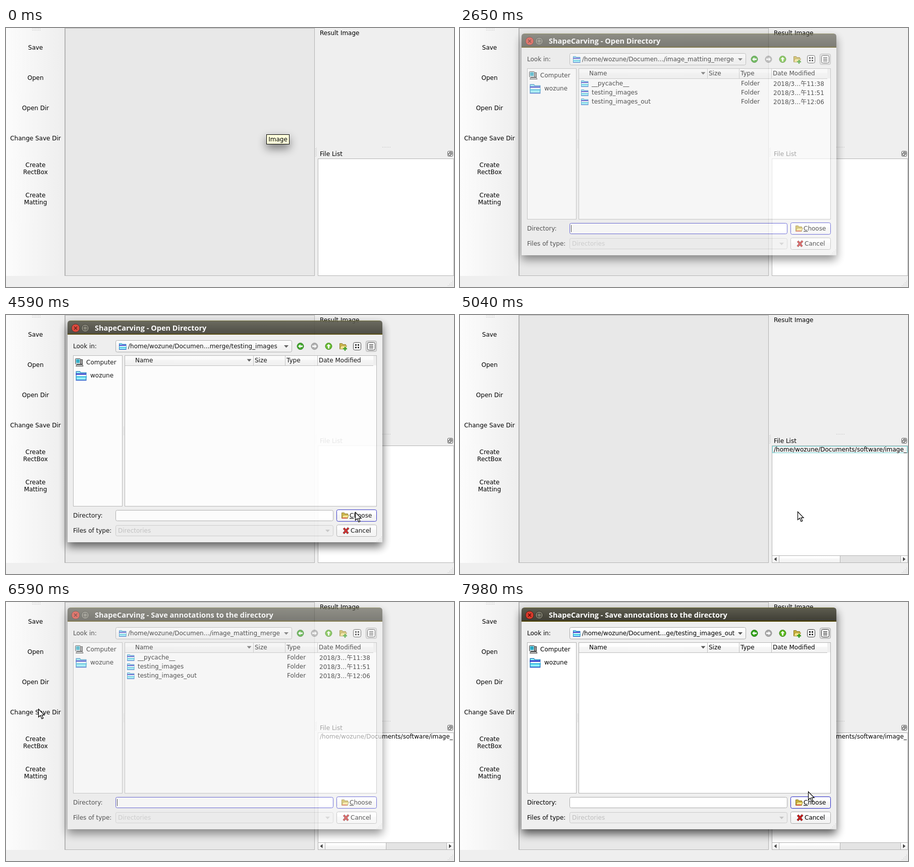
These frames come from a looping animation (888x514 px, 8000 ms). An HTML page:

```html
<!DOCTYPE html>
<html lang="en">
<head>
<meta charset="utf-8">
<title>Matting tool</title>
<style>
html, body { margin: 0; width: 100%; height: 100%; overflow: hidden; background: #efefef; }
svg { display: block; font: 12px "DejaVu Sans", "Noto Sans CJK SC", "Noto Sans CJK", sans-serif; }
.shadow { filter: blur(9px); }
.title { font: bold 14.5px "Open Sans", sans-serif; fill: #fff; }
.mid { text-anchor: middle; }
.dots { stroke: #b4b4b4; stroke-dasharray: 1 2; }
</style>
</head>
<body>
<svg id="stage" width="888" height="514" viewBox="0 0 888 514"></svg>
<script>
const USER = 'wozune', APP = 'ShapeCarving', HOME = `/home/${USER}/`;

// Markup helpers
const box = (x, y, w, h, fill, stroke = 'none', r = 0, extra = '') =>
  `<rect x="${x + .5}" y="${y + .5}" width="${w - 1}" height="${h - 1}" rx="${r}" fill="${fill}" stroke="${stroke}" ${extra}/>`;
const fillBox = (x, y, w, h, fill, extra = '') =>
  `<rect x="${x}" y="${y}" width="${w}" height="${h}" fill="${fill}" ${extra}/>`;
const text = (x, y, s, extra = '') => `<text x="${x}" y="${y}" ${extra}>${s}</text>`;
const path = (d, fill, stroke = 'none', extra = '') => `<path d="${d}" fill="${fill}" stroke="${stroke}" ${extra}/>`;
const group = (x, y, body, scale = 1) => `<g transform="translate(${x} ${y}) scale(${scale})">${body}</g>`;
const dots = (x, y, w, h = 0) => path(`M${x} ${y}l${w} ${h}`, 'none', '', 'class="dots"').replace('stroke="" ', '');
const gradient = (id, stops, across) =>
  `<linearGradient id="${id}" x2="${across ? 1 : 0}" y2="${across ? 0 : 1}">` +
  stops.map(([at, color]) => `<stop offset="${at}" stop-color="${color}"/>`).join('') + '</linearGradient>';
const grip = (x, y) => [0, 1, 2, 3].map(i => dots(x + 9 - 3 * i, y + 3 * i + .5, 3 * i + 1)).join('');
const downArrow = (x, y, fill) => path(`M${x} ${y}h9l-4.5 5z`, fill);

const folder = (x, y, scale = 1) => group(x, y,
  path('M1.5 13V1.5h5l1 1.5h7.5v10z', '#8ff4fb', '#1d7fc0') +
  fillBox(1, 4, 14, 2, '#2929c4') + fillBox(2, 6, 13, 2, '#fff') + fillBox(1, 8, 15, 1.5, '#28b4dc') +
  path('M1 13.5h14.5', 'none', '#2a5ad0'), scale);
const goldFolder = (x, y) => group(x, y,
  path('M1.5 13.5V2.5h5l1 2h6v9z', '#c9b23c', '#8b7420') +
  path('M1.5 13.5l3-6.5h11l-3 6.5z', '#f3e383', '#a28a2c'));
const navButton = (x, color, edge, angle) =>
  `<g transform="translate(${x} 62) rotate(${angle})"><circle r="6.5" fill="${color}" stroke="${edge}"/>` +
  path('M-4.5 0L0 -4V-1.5H4.5V1.5H0V4z', '#fff') + '</g>';

const mainWindow = () => {
  const labels = [['Save', 43], ['Open', 103], ['Open Dir', 163], ['Change Save Dir', 223],
    ['Create', 276], ['RectBox', 290], ['Create', 336], ['Matting', 350]];
  return fillBox(0, 0, 888, 514, '#efefef') +
    fillBox(0, 0, 116, 492, 'url(#toolbar)') + dots(52, 1.5, 17) + dots(52, 4.5, 17) +
    box(116, 0, 496, 492, '#e8e8e8', '#b4b4b4') + fillBox(117, 0, 1, 492, '#b4b4b4') +
    `<g id="hover">${box(0, 0, 117, 60, 'url(#button)', '#a8a8a8', 2)}</g>` +
    labels.map(([s, y]) => text(58.5, y, s, 'class="mid"')).join('') +
    text(622, 14, 'Result Image') + text(622, 254, 'File List') +
    dots(746, 236.5, 17) + dots(615.5, 238, 0, 17) + dots(613.5, 239, 0, 17) +
    box(875, 244, 11, 11, '#f4f4f4', '#555', 2) + box(879, 246, 5, 5, 'none', '#444') + box(877, 248, 5, 5, '#f4f4f4', '#444') +
    box(618, 259, 270, 233, '#fff', '#b4b4b4') +
    `<g id="files">` +
      `<g id="rowFocus">${box(619, 260, 268, 14, '#f2f2f2', '#6fd6d6')}</g>` +
      text(622, 271, HOME + 'Documents/software/image_') +
      fillBox(619, 477, 268, 14, '#e4e4e4') + path('M619 477.5h268', 'none', '#b4b4b4') +
      box(618, 477, 15, 15, 'url(#button)', '#b4b4b4') + box(632, 477, 122, 15, 'url(#button)', '#b4b4b4') +
      box(873, 477, 15, 15, 'url(#button)', '#b4b4b4') +
      path('M627.5 480.5v8l-5 -4zM878 480.5v8l5 -4z', '#444') +
    `</g>` +
    text(6, 507, '', 'id="status"') + grip(876, 502) +
    `<g id="tooltip">${fillBox(516, 219, 46, 20, '#000', 'class="shadow" opacity=".5"')}` +
      box(516, 211, 46, 20, '#ffffdc', '#000') + text(539, 225, 'Image', 'class="mid"') + '</g>';
};

const titleBar = () =>
  path('M122 39V17q0-6 6-6H740q6 0 6 6V39z', 'url(#title)') + path('M127 11.5H741', 'none', '#6c6a2c') +
  fillBox(122, 37, 624, 2, '#4c4000') +
  '<circle cx="138" cy="26" r="8" fill="#dc3a2c" stroke="#4a2018"/>' +
  path('M135 23l6 6m0-6l-6 6', 'none', '#501008', 'stroke-width="1.5"') +
  '<circle cx="157" cy="26" r="7.5" fill="#7c7b6c" stroke="#35342c"/>' + box(153, 22, 8, 8, 'none', '#35342c') +
  text(176, 31, '', 'id="title-text" class="title"');

const navigation = () =>
  text(133, 66, 'Look in:') + box(217, 50, 350, 24, 'url(#button)', '#ababab', 3) +
  folder(223, 55) + text(242, 66, '', 'id="location"') + downArrow(551, 60, '#555') +
  navButton(583.5, '#31a318', '#1d7010', 0) + navButton(611.5, '#a8a8a8', '#8e8e8e', 180) +
  navButton(639.5, '#5cb81c', '#2c7a10', 90) +
  goldFolder(660, 54) + path('M672 63v8m-4-4h8', 'none', '#2f9a18', 'stroke-width="2.5"') +
  box(688, 54, 16, 16, '#fff', '#333', 3) +
  [692, 697].map(x => [58, 63].map(y => fillBox(x, y, 3, 3, '#222')).join('')).join('') +
  box(713, 51, 22, 22, '#dedede', '#a4a4a4', 3) + box(716, 54, 16, 16, '#fff', '#333', 3) +
  path('M720 58.5h8m-8 2.5h8m-8 2.5h8m-8 2.5h8', 'none', '#222');

const sidebar = () =>
  box(133, 80, 98, 300, '#fff', '#b4b4b4') +
  box(137, 86, 11, 12, '#d8e6ea', '#333', 1) + fillBox(139, 88, 7, 7, '#27a9c4') +
  box(147, 88, 5, 10, '#999', '#333') + path('M138.5 101.5l2-3h11l1.5 3z', '#ccc', '#333') + text(159, 98, 'Computer') +
  folder(137, 110, 1.45) + text(167, 124, USER) + dots(233.5, 222, 0, 17);

const listing = () => {
  const columns = [[256, 'Name'], [493, 'Size'], [556, 'Type'], [620, 'Date Modified']];
  const rows = [['__pycache__', '11:38'], ['testing_images', '11:51'], ['testing_images_out', '12:06']];
  return box(235, 80, 500, 300, '#fff', '#b4b4b4') + fillBox(236, 81, 498, 19, 'url(#button)') +
    fillBox(728, 81, 6, 19, '#efefef') +
    path('M236 100.5H728M490.5 81v19M553.5 81v19M617.5 81v19', 'none', '#bdbdbd') +
    columns.map(([x, s]) => text(x, 94, s)).join('') + downArrow(477.5, 87.5, '#555') +
    '<g id="rows">' + rows.map(([name, time], i) => {
      const y = 114 + 18 * i;
      return folder(239, y - 11) + text(261, y, name) + text(557, y, 'Folder') + text(621, y + 1, '2018/3…午' + time);
    }).join('') + '</g>';
};

const dialogForm = () =>
  text(133, 402, 'Directory:') + box(217, 387, 432, 22, '#fff', '#ababab', 3, 'id="input"') +
  fillBox(220, 391, 1, 14, '#000', 'id="caret"') +
  text(133, 432, 'Files of type:') + box(217, 417, 432, 22, '#ededed', '#c9c9c9', 3) +
  text(222, 432, 'Directories', 'fill="#bebebe"') + downArrow(633, 426, '#c4c4c4') +
  box(655, 386, 80, 24, 'url(#button)', '#2525c4', 3) + goldFolder(664, 390) + fillBox(666, 402, 10, 2, '#cc4a30') +
  text(681, 402, '<tspan text-decoration="underline">C</tspan>hoose') +
  box(655, 416, 80, 24, 'url(#button)', '#ababab', 3) +
  path('M669.5 423l8.5 10.5m1-11l-10 11', 'none', '#4a0c0c', 'stroke-width="4"') +
  path('M669.5 423l8.5 10.5m1-11l-10 11', 'none', '#dc2020', 'stroke-width="2.4"') +
  text(683, 432, 'Cancel') + grip(735, 440);

const $ = id => document.getElementById(id);
$('stage').innerHTML = '<defs>' +
  gradient('toolbar', [[0, '#fcfcfc'], [1, '#eeeeee']], true) +
  gradient('button', [[0, '#fff'], [.42, '#fdfdfd'], [.43, '#f7f7f7'], [1, '#f2f2f2']]) +
  gradient('title', [[0, '#5e5d50'], [1, '#3d3c33']]) + '</defs>' + mainWindow() +
  '<g id="dialog">' + fillBox(122, 20, 624, 440, '#000', 'class="shadow" opacity=".65"') +
  fillBox(122, 38, 624, 413, '#efefef') + titleBar() + navigation() + sidebar() + listing() + dialogForm() + '</g>' +
  `<g id="cursor">${path('M.5 .5V16.5L4.3 13 7 19.8 9.8 18.6 7 12.3H12z', '#fff', '#000', 'stroke-width="1.2"')}</g>`;

const DURATION = 8000;
const hovers = [ // time, top of hovered button, status text
  [0], [700, 189], [980, 129, 'Open image dir'], [1200, 69, 'Open image'], [1750, 129, 'Open image dir'],
  [2610], [5790, 129, 'Open image dir'], [6090, 189], [6550]];
const cursorKeys = [ // time, x, y
  [2690, 90, 168], [3140, 355, 129], [3340, 355, 129], [3440, 364, 126], [3720, 364, 126],
  [4330, 708, 388], [4510, 692, 391], [4940, 692, 391], [5040, 669, 390], [5750, 45, 218],
  [5910, 58, 172], [6030, 58, 172], [6060, 61, 183], [6260, 62, 212], [6580, 62, 212], [6770, 268, 172], [6890, 268, 172],
  [7080, 303, 139], [7260, 317, 146], [7440, 317, 146], [7850, 708, 388], [7980, 690, 376], [8000, 690, 376]];

const clamp = v => Math.max(0, Math.min(1, v));
const show = (id, on) => $(id).setAttribute('visibility', on ? 'visible' : 'hidden');

function cursorAt(t) {
  const i = Math.max(1, cursorKeys.findIndex(k => k[0] > t));
  const [t0, x0, y0] = cursorKeys[i - 1], [t1, x1, y1] = cursorKeys[i];
  const p = clamp((t - t0) / (t1 - t0)), e = p * p * (3 - 2 * p);
  return [Math.round(x0 + (x1 - x0) * e), Math.round(y0 + (y1 - y0) * e)];
}

function render(t) {
  const [, top, status = ''] = hovers.findLast(h => h[0] <= t);
  show('hover', top !== undefined);
  $('hover').setAttribute('transform', `translate(0 ${top || 0})`);
  $('status').textContent = status;
  show('tooltip', t < 980);

  const saving = t > 6000;
  const opacity = saving ? clamp((t - 6530) / 95) : Math.min(clamp((t - 2590) / 95), clamp((4690 - t) / 110));
  const active = saving ? t >= 6550 : t >= 2610 && t < 4690;
  const inside = t >= (saving ? 7440 : 3720);
  show('dialog', active);
  $('dialog').setAttribute('opacity', opacity);
  $('title-text').textContent = `${APP} - ${saving ? 'Save annotations to the directory' : 'Open Directory'}`;
  $('location').textContent = HOME + (!inside ? 'Documen…/image_matting_merge'
    : saving ? 'Document…ge/testing_images_out' : 'Documen…merge/testing_images');
  $('rows').setAttribute('display', inside ? 'none' : 'inline');
  $('input').setAttribute('stroke', inside ? '#ababab' : '#2525c4');
  $('caret').setAttribute('opacity', t < 3110 || saving && t < 7050 ? 1 : 0);

  $('files').setAttribute('display', t >= 4820 ? 'inline' : 'none');
  $('rowFocus').setAttribute('display', active ? 'none' : 'inline');
  show('cursor', t >= 2690);
  $('cursor').setAttribute('transform', `translate(${cursorAt(t)})`);
}

const start = performance.now();
function tick() {
  render((performance.now() - start) % DURATION);
  requestAnimationFrame(tick);
}
tick();
</script>
</body>
</html>
```
